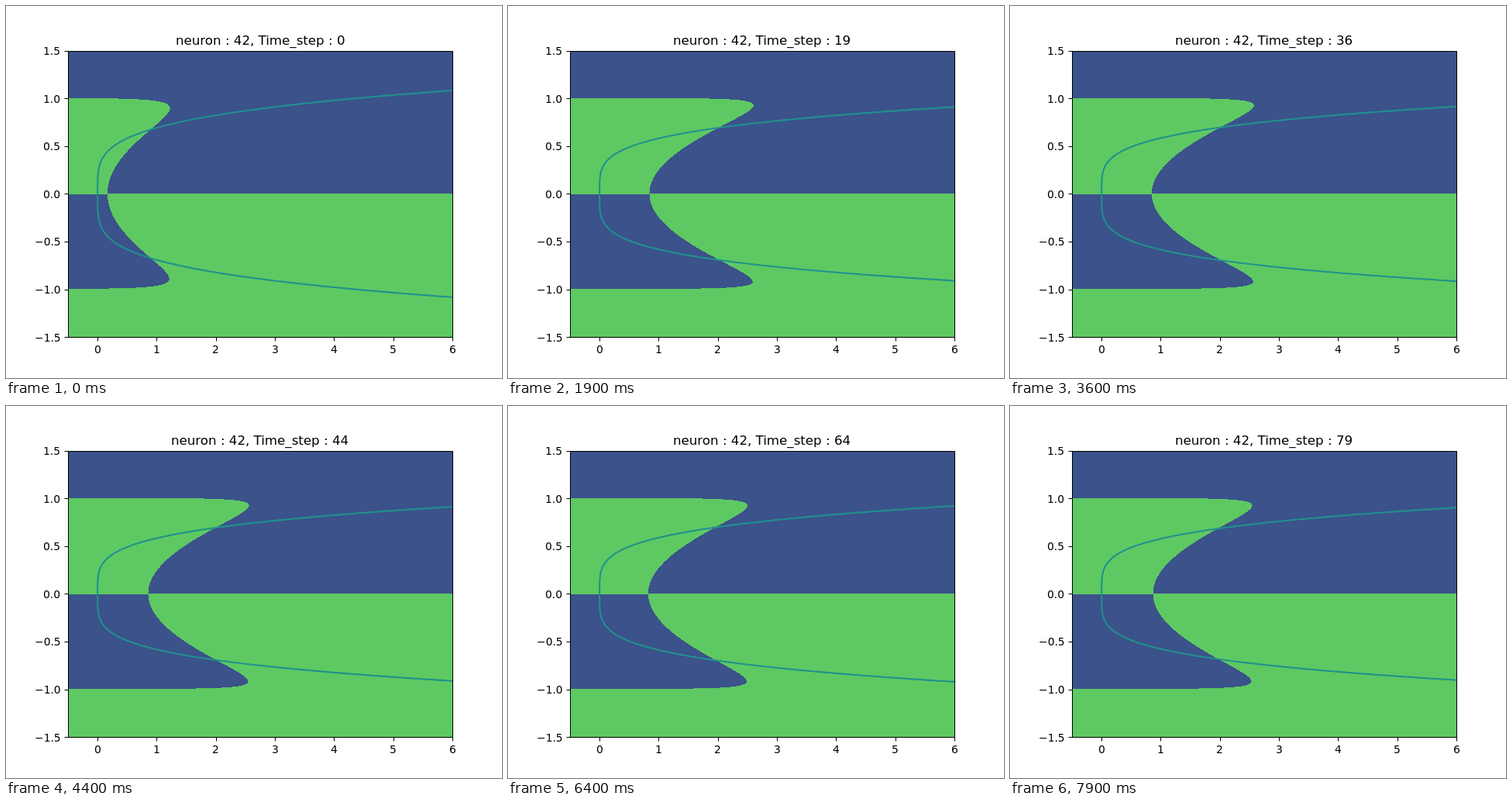
Recreate the animation shown at these times as an HTML page with a canvas. Size 640 px wide and 480 px high, loop 8000 ms.

```html
<!DOCTYPE html>
<html>
<head>
<meta charset="utf-8">
<title>Phase plane</title>
<style>
html, body { margin: 0; width: 100%; height: 100%; overflow: hidden; background: #fff; }
canvas { display: block; }
</style>
</head>
<body>
<canvas id="stage" width="640" height="480"></canvas>
<script>
const ctx = document.getElementById('stage').getContext('2d');
const LEFT = 80, RIGHT = 576, TOP = 58, BOTTOM = 427;
const BLUE = '#3b528b', GREEN = '#5ec962', TEAL = '#21918c';
const STEPS = 80, STEP_MS = 100;
const X0 = 118.15, Y0 = 242.4, X_UNIT = 76.308, Y_UNIT = 123.2;
const toX = x => X0 + x * X_UNIT;
const toY = y => Y0 - y * Y_UNIT;

// step, fold position, cubic gain, height of the slow curve at x = 6
const keys = [
  [0, 0.168, 2.08, 1.083],
  [9, 0.896, 2.888, 0.896],
  [19, 0.843, 2.93, 0.91],
  [29, 0.843, 2.918, 0.917],
  [44, 0.856, 2.865, 0.912],
  [64, 0.823, 2.834, 0.921],
  [79, 0.87, 2.834, 0.903]
];

function paramsAt(step) {
  let i = 1;
  while (i < keys.length - 1 && keys[i][0] < step) i++;
  const a = keys[i - 1], b = keys[i];
  let u = (step - a[0]) / (b[0] - a[0]);
  // the first stretch settles quickly
  if (i === 1 && u < 1) u = 1 - Math.exp(-step / 1.5);
  return a.map((v, j) => v + (b[j] - v) * u);
}

function rect(color, x, y, w, h) {
  ctx.fillStyle = color;
  ctx.fillRect(x, y, w, h);
}

// nullcline of y = tanh((1 + fold - x) y + gain y^3), solved for x
function fastX(y, fold, gain) {
  if (Math.abs(y) >= 1) return -9;
  return fold + 1 + gain * y * y - Math.atanh(y) / y + 0.008 * y;
}

function drawRegions(fold, gain) {
  for (let row = TOP; row < BOTTOM; row++) {
    const y = (Y0 - row - 1) / Y_UNIT;
    const edge = Math.round(toX(fastX(y, fold, gain)));
    const split = Math.max(LEFT, Math.min(RIGHT, edge));
    const [near, far] = y > 0 ? [GREEN, BLUE] : [BLUE, GREEN];
    rect(near, LEFT, row, split - LEFT, 1);
    rect(far, split, row, RIGHT - split, 1);
  }
  rect(GREEN, LEFT, Math.floor(Y0), RIGHT - LEFT, 1);
}

function drawSlowCurve(end) {
  ctx.save();
  ctx.beginPath();
  ctx.rect(LEFT, TOP, RIGHT - LEFT, BOTTOM - TOP);
  ctx.clip();
  ctx.beginPath();
  for (let i = -105; i <= 105; i++) {
    const s = i / 100;
    ctx.lineTo(toX(6 * s ** 4), toY(s * end));
  }
  ctx.strokeStyle = TEAL;
  ctx.lineWidth = 2.08;
  ctx.stroke();
  ctx.restore();
}

// anchor: 0.5 centres the text on x, 1 ends it there; the start snaps to a pixel
function label(text, x, y, size, anchor) {
  ctx.font = size + 'px "DejaVu Sans", sans-serif';
  ctx.fillStyle = '#000';
  ctx.fillText(text, Math.round(x - ctx.measureText(text).width * anchor), Math.round(y));
}

function drawAxes() {
  ctx.strokeStyle = '#000';
  ctx.lineWidth = 1;
  ctx.strokeRect(LEFT + 0.5, TOP + 0.5, RIGHT - LEFT, BOTTOM - TOP);
  for (let i = 0; i <= 6; i++) {
    const x = toX(i);
    rect('#000', Math.round(x), BOTTOM + 1, 1, 4.5);
    label(String(i), x, 448, 13.89, 0.5);
    const v = 1.5 - i / 2, y = toY(v);
    rect('#000', LEFT - 4.5, Math.round(y), 4.5, 1);
    label((v < 0 ? '\u2212' : '') + Math.abs(v).toFixed(1), 70.3, y + 5.3, 13.89, 1);
  }
}

function frame(now) {
  const step = Math.floor(now / STEP_MS) % STEPS;
  const [, fold, gain, end] = paramsAt(step);
  rect('#fff', 0, 0, 640, 480);
  drawRegions(fold, gain);
  drawSlowCurve(end);
  drawAxes();
  label('neuron : 42, Time_step : ' + step, 328, 50, 16.67, 0.5);
}

const start = performance.now();
function tick() {
  frame(performance.now() - start);
  requestAnimationFrame(tick);
}
tick();
</script>
</body>
</html>
```
